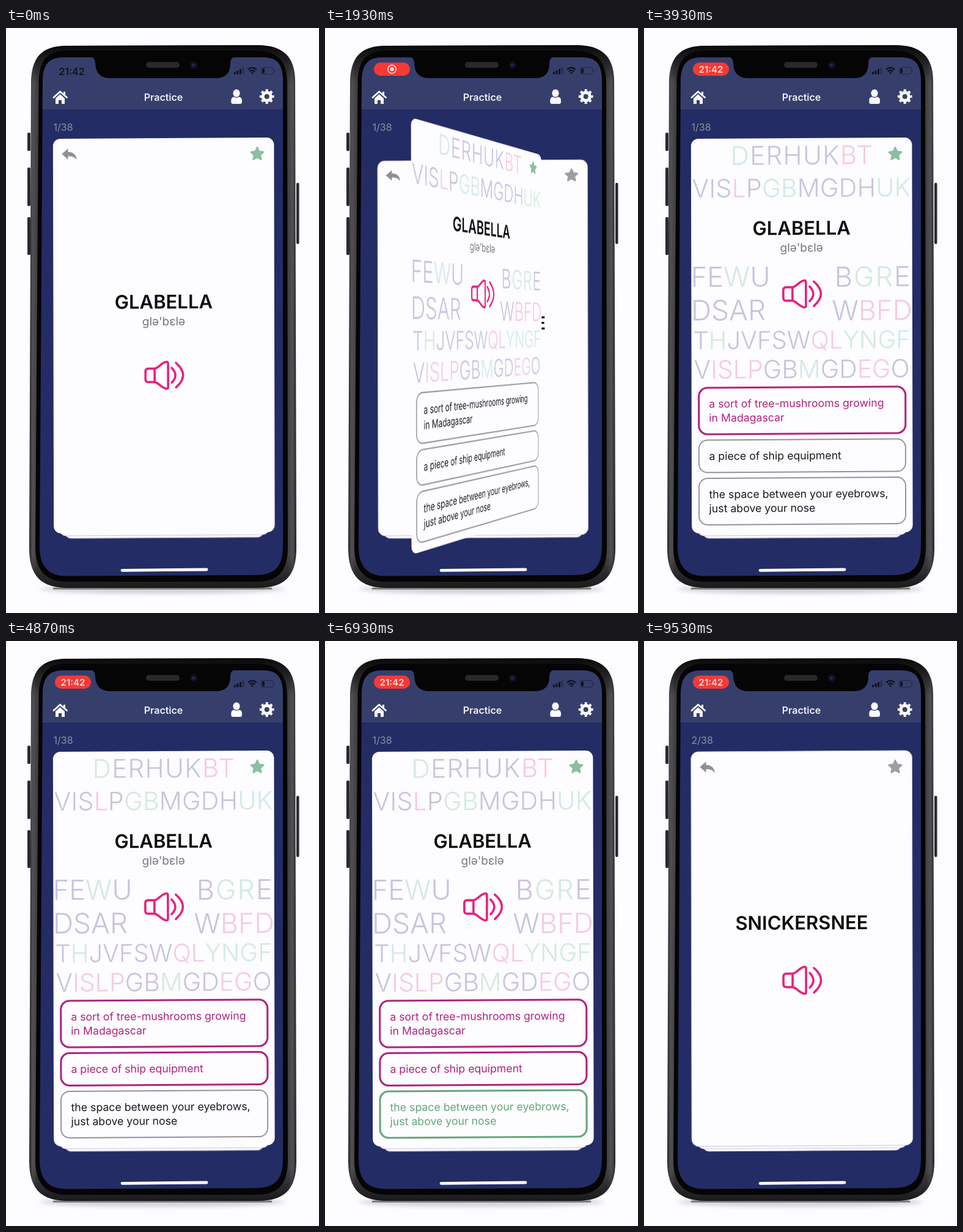
These frames come from a looping animation (512 px wide and 956 px high, 9590 ms). An HTML page:

```html
<!DOCTYPE html>
<html lang="en">
<head>
<meta charset="utf-8">
<title>Vocabulary practice</title>
<style>
  html, body { margin: 0; width: 100%; height: 100%; overflow: hidden; background: #fdfcfe; }
  .stage { position: relative; width: 512px; height: 956px; overflow: hidden; font-family: Inter, "Open Sans", sans-serif; }
  .layer, .layer svg { position: absolute; left: 0; top: 0; width: 512px; height: 956px; }
  .screen { clip-path: inset(0 58px 0 60px); }

  /* Cards behind the top one: each 5% smaller and 4px lower. */
  .deck { --s: .9025; --y: 8px; --s2: .95; --y2: 4px; transform: translateY(var(--y)) scale(var(--s)); transform-origin: 258px 825px; }
  .rise { animation: rise 9.59s infinite; }
  #next { --s: .95; --y: 4px; --s2: 1; --y2: 0px; }

  .swipe, .card, .face { transform-origin: 258px 503px; }
  .swipe { perspective: 1500px; perspective-origin: 258px 503px; animation: swipe 9.59s infinite; }
  .card { transform-style: preserve-3d; animation: flip 9.59s infinite; }
  .face { backface-visibility: hidden; }
  .face.back { transform: rotateY(180deg); }

  .word { font-size: 31px; font-weight: 600; fill: #0d0c0e; text-anchor: middle; }
  .ipa { font-size: 19px; fill: #77757a; text-anchor: middle; }
  .paper { fill: #fdfcfe; }
  .deck .paper { stroke: #c3c5da; }
  .sound { fill: none; stroke: #e6217f; stroke-width: 3.6; stroke-linecap: round; stroke-linejoin: round; }
  .letters { font-weight: 300; }

  .choice { --ink: #1b1a1d; --edge: #949297; --w: 1.9px; animation: 9.59s step-end infinite; }
  .choice text { font-size: 17.7px; fill: var(--ink); }
  .choice rect { fill: #fdfcfe; stroke: var(--edge); stroke-width: var(--w); }
  .c0 { --hit: #b0237f; animation-name: pick0; }
  .c1 { --hit: #b0237f; animation-name: pick1; }
  .c2 { --hit: #64a67c; animation-name: pick2; }

  .plain, .pill, .rec, .clock, .one, .two { animation: 9.59s step-end infinite; }
  .plain { animation-name: hideEarly; }
  .pill { animation-name: showEarly; }
  .rec { animation-name: hideMid; }
  .clock { animation-name: showMid; }
  .one { animation-name: hideLate; }
  .two { animation-name: showLate; }

  @keyframes hideEarly { 0% { opacity: 1 } 5.2%, 100% { opacity: 0 } }
  @keyframes showEarly { 0% { opacity: 0 } 5.2%, 100% { opacity: 1 } }
  @keyframes hideMid { 0% { opacity: 1 } 33.4%, 100% { opacity: 0 } }
  @keyframes showMid { 0% { opacity: 0 } 33.4%, 100% { opacity: 1 } }
  @keyframes hideLate { 0% { opacity: 1 } 83.4%, 100% { opacity: 0 } }
  @keyframes showLate { 0% { opacity: 0 } 83.4%, 100% { opacity: 1 } }
  @keyframes pick0 { 34.4%, 100% { --ink: var(--hit); --edge: var(--hit); --w: 3.1px } }
  @keyframes pick1 { 46.9%, 100% { --ink: var(--hit); --edge: var(--hit); --w: 3.1px } }
  @keyframes pick2 { 55.3%, 100% { --ink: var(--hit); --edge: var(--hit); --w: 3.1px } }
  @keyframes flip {
    0%, 17.1% { transform: rotateY(0deg); animation-timing-function: ease-in-out }
    22%, 100% { transform: rotateY(-180deg) }
  }
  /* Dragging turns and shrinks the card in proportion to its distance. */
  @keyframes swipe {
    0%, 76.1% { transform: translate(0px, 0px) rotate(0deg) scale(1); animation-timing-function: ease-in }
    80% { transform: translate(154.5px, 19px) rotate(-7.7deg) scale(.914); animation-timing-function: linear }
    83.2%, 100% { transform: translate(430px, 45px) rotate(-18deg) scale(.8) }
  }
  @keyframes rise {
    0%, 76.1% { transform: translateY(var(--y)) scale(var(--s)); animation-timing-function: ease-in }
    80.2%, 100% { transform: translateY(var(--y2)) scale(var(--s2)) }
  }
</style>
</head>
<body>
<div class="stage">
  <svg class="layer" viewBox="0 0 512 956">
    <defs>
      <linearGradient id="rim">
        <stop offset="0" stop-color="#242325"/><stop offset=".012" stop-color="#525054"/>
        <stop offset=".03" stop-color="#403f42"/><stop offset=".968" stop-color="#403f42"/>
        <stop offset=".986" stop-color="#525054"/><stop offset="1" stop-color="#242325"/>
      </linearGradient>
      <linearGradient id="shade" x2="0" y2="1">
        <stop offset="0" stop-color="#000" stop-opacity=".85"/><stop offset=".07" stop-color="#000" stop-opacity="0"/>
        <stop offset=".94" stop-color="#000" stop-opacity="0"/><stop offset="1" stop-color="#000" stop-opacity=".6"/>
      </linearGradient>
      <path id="body" d="M41 92C41 48 58 29 100 29L410 28C454 28 473 47 473 88L475 850C475 896 456 915 411 915H102C58 915 38 896 38 850Z"/>
      <clipPath id="glass">
        <path d="M60 90C60 62 68 48 94 48H420C446 48 453 62 453 88V846C453 880 440 894 408 894L98 895.5C70 895.5 55 880 55 848Z"/>
      </clipPath>
      <filter id="soft" x="-20%" y="-300%" width="140%" height="700%"><feGaussianBlur stdDeviation="5 3"/></filter>
    </defs>

    <ellipse cx="256" cy="917" rx="200" ry="8" fill="#b9b8bc" opacity=".6" filter="url(#soft)"/>
    <path d="M78 916H434" stroke="#77767a" stroke-width="3" stroke-linecap="round"/>
    <g fill="#2b2a2c">
      <rect x="35" y="171" width="5" height="30" rx="2"/>
      <rect x="35" y="228" width="5" height="63" rx="2"/>
      <rect x="35" y="309" width="5" height="62" rx="2"/>
      <rect x="475" y="253" width="4.500" height="100" rx="2"/>
    </g>
    <use href="#body" fill="url(#rim)"/>
    <use href="#body" fill="url(#shade)"/>
    <path d="M53.500 92C53.500 54 66 37 101 37H408C444 37 460 54 460 90L461 848C461 888 446 905 408 905H101C66 905 48 888 48 848Z" fill="#050506"/>

    <g clip-path="url(#glass)">
      <rect x="50" y="40" width="410" height="860" fill="#232c65"/>
      <rect x="50" y="40" width="410" height="93" fill="#363f6c"/>
    </g>
    <path d="M139 47Q146 49 146 58Q147 82 171 82H343Q367 82 367 58Q367 49 374 47Z" fill="#050506"/>
    <rect x="229" y="55.500" width="55" height="9.500" rx="4.700" fill="#2b2829"/>
    <circle cx="307" cy="60.500" r="6" fill="#111120"/>
    <circle cx="306.500" cy="60.500" r="2.500" fill="#22265a"/>

    <text class="plain" x="107.500" y="76.500" font-size="16" font-weight="600" fill="#11131d" text-anchor="middle">21:42</text>
    <g class="pill">
      <rect x="80" y="56.500" width="59" height="21.500" rx="10.700" fill="#f53a36"/>
      <g class="rec" fill="none" stroke="#fbdcda" stroke-width="1.600">
        <circle cx="109.500" cy="67.300" r="6.700"/><circle cx="109.500" cy="67.300" r="3.200" fill="#fbdcda" stroke="none"/>
      </g>
      <text class="clock" x="109.500" y="72.600" font-size="15" font-weight="600" fill="#fbdcda" text-anchor="middle">21:42</text>
    </g>
    <g fill="#11131d">
      <path d="M373 71.500h3v4h-3zM377.500 69.500h3v6h-3zM382 67h3v8.500h-3z"/>
      <path d="M386.500 64.500h3v11h-3z" opacity=".4"/>
      <path d="M396 68Q403 61.500 410 68M398.800 71.200Q403 67.300 407.200 71.200" fill="none" stroke="#11131d" stroke-width="2.400"/>
      <path d="M400.700 72.800Q403 71 405.300 72.800L403 75.500Z"/>
      <rect x="417.500" y="64.500" width="20" height="11" rx="3" fill="none" stroke="#11131d" opacity=".55"/>
      <rect x="419" y="66" width="4" height="8" rx="1.500"/>
      <path d="M439 68v4q2-2 0-4z" opacity=".55"/>
    </g>

    <g fill="#fbfbfe">
      <path d="M78 113.500L88.500 104L99.500 113.500" fill="none" stroke="#fbfbfe" stroke-width="2.800" stroke-linecap="round"/>
      <path d="M94 104h3v6l-3-2.500zM81 115L88.500 108.300L96 115V124H91V118H86V124H81Z"/>
      <ellipse cx="377" cy="106.500" rx="5.600" ry="6.300"/>
      <path d="M368.300 121V118.500Q368.300 113 373 112.500Q377 115.500 381 112.500Q386 113 386 118.500V121Q386 124 382.500 124H371.500Q368.300 124 368.300 121Z"/>
      <g fill="none" stroke="#fbfbfe">
        <circle cx="426.700" cy="112" r="6.600" stroke-width="5.200"/>
        <circle cx="426.700" cy="112" r="10" stroke-width="3.800" pathLength="16" stroke-dasharray="1 1" stroke-dashoffset=".5"/>
      </g>
    </g>
    <text x="257.500" y="118.500" font-size="16" font-weight="600" fill="#eeeef5" text-anchor="middle">Practice</text>
    <g font-size="16" fill="#8f909d">
      <text class="one" x="77.500" y="167.500">1/38</text>
      <text class="two" x="77.500" y="167.500">2/38</text>
    </g>
    <path d="M190 886.300L328 885" stroke="#fdfcfe" stroke-width="4.800" stroke-linecap="round"/>
  </svg>

  <div class="layer screen">
    <div class="layer two"><div class="layer deck" id="last"></div></div>
    <div class="layer deck rise" id="third"></div>
    <div class="layer deck rise" id="next"></div>
    <div class="layer swipe">
      <div class="layer card">
        <div class="layer face" id="front"></div>
        <div class="layer face back" id="back"></div>
      </div>
    </div>
  </div>
</div>

<script>
const GREEN = '#8cbf9f', GREY = '#9f9da2';
const tints = { l: '#c5c4df', m: '#d2eae0', p: '#f4cbe0', g: '#c6c5c9' };

// The whole screen leans very slightly.
const sheet = body => `<svg viewBox="0 0 512 956"><g transform="matrix(1 -.006 .002 1 -1 1.55)">${body}</g></svg>`;
const paper = '<rect class="paper" x="77.5" y="180" width="361.5" height="645" rx="12"/>';

const star = color => {
  const pts = Array.from({ length: 10 }, (_, i) => {
    const a = i * Math.PI / 5 - Math.PI / 2, r = i % 2 ? 5.6 : 11.3;
    return `${(411.5 + r * Math.cos(a)).toFixed(1)},${(207 + r * Math.sin(a)).toFixed(1)}`;
  });
  return `<polygon points="${pts.join(' ')}" fill="${color}" stroke="${color}" stroke-width="2" stroke-linejoin="round"/>`;
};

const reply = `<path d="M92 205L102 196V201.500C111 202 116 206.500 116 214.500C113 210 109 208.500 102 208.500V214Z" fill="#918f93"/>`;

const sound = y => `<path class="sound" transform="translate(258 ${y})" d="M-15-11H-25Q-30-11-30-6V6Q-30 11-25 11H-15V-11
  C-8-12-3-22 5-22Q7-22 7-19V19Q7 22 5 22C-3 22-8 12-15 11M13-12Q25 0 13 12M20-20Q43 0 20 20"/>`;

const word = (text, y) => `<text class="word" x="258" y="${y}">${text}</text>`;
const ipa = y => `<text class="ipa" x="258" y="${y}">glə'bɛlə</text>`;

// A lowercase code sets the tint of the capitals after it.
const row = (x, y, size, anchor, text, gap = 0) => {
  const spans = text.replace(/([a-z])([A-Z]+)/g, (_, c, s) => `<tspan fill="${tints[c]}">${s}</tspan>`);
  return `<text x="${x}" y="${y}" font-size="${size}" text-anchor="${anchor}" letter-spacing="${gap}">${spans}</text>`;
};

const rows = [
  [259, 223, 42, 'middle', 'mDlERHUKpBT', 1.4],
  [258, 276, 41, 'middle', 'lVISpLgPmGBlMGDHmUK', .3],
  [77, 422, 45, 'start', 'lFEmWlU'],
  [438, 423, 45, 'end', 'lBmGRlE', 2],
  [77, 477, 46, 'start', 'lDSAR'],
  [439, 478, 45, 'end', 'lWpBFD'],
  [258, 524, 40, 'middle', 'lTmHlJVFSWpQLmYNGF'],
  [258, 572, 41, 'middle', 'lVpISLPlGBmMlGDpEGlO']
];

const choices = [
  [587, 76, 'a sort of tree-mushrooms growing', 'in Madagascar'],
  [672.5, 53, 'a piece of ship equipment'],
  [735, 76, 'the space between your eyebrows,', 'just above your nose']
];

const choice = ([y, h, ...lines], i) => `<g class="choice c${i}">
  <rect x="89.500" y="${y}" width="338" height="${h}" rx="14"/>
  ${lines.map((s, n) => `<text x="106" y="${y + 32.5 + n * 23}">${s}</text>`).join('')}</g>`;

const put = (id, ...parts) => document.getElementById(id).innerHTML = sheet(parts.join(''));

put('last', paper);
put('third', paper);
put('next', paper, reply, star(GREY), word('SNICKERSNEE', 471.5), sound(554.5));
put('front', paper, reply, star(GREEN), word('GLABELLA', 458.5), ipa(486), sound(567.5));
put('back', paper, `<g class="letters">${rows.map(r => row(...r)).join('')}</g>`, star(GREEN),
  word('GLABELLA', 338), ipa(365.5), sound(434.5), choices.map(choice).join(''));
</script>
</body>
</html>
```
